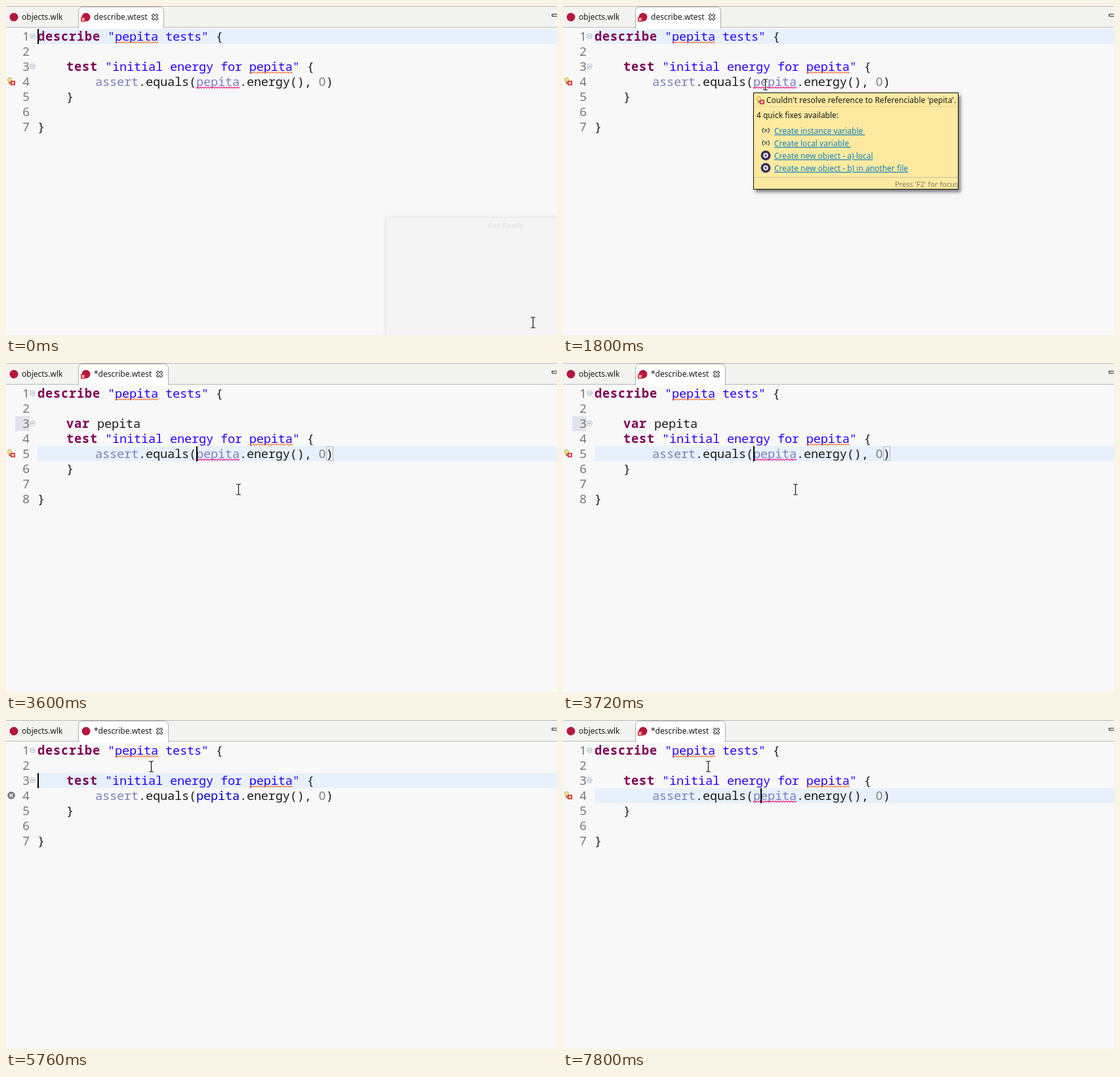
These frames come from a looping animation (840x502 px, 8 s). An HTML page:

```html
<!DOCTYPE html>
<html lang="en">
<head>
<meta charset="utf-8">
<title>Quick fix in a test editor</title>
<style>
  html, body { margin: 0; height: 100%; overflow: hidden; background: #f8f8f8; }
  svg { display: block; width: 840px; height: 502px; }
  text { white-space: pre; font: 12px "Noto Sans", "Open Sans", sans-serif; fill: #1a1a1a; }
  .code { font: 18.67px "Noto Sans Mono", "DejaVu Sans Mono", monospace; letter-spacing: -.2px; }
  .key { font-weight: bold; letter-spacing: .8px; fill: #7f0055; }
  .str { fill: #2a00ff; }
  .ref { fill: #7d7dbe; }
  .field { fill: #0000c0; }
  .digit { font: 18.67px "Noto Sans", sans-serif; letter-spacing: .32px; fill: #7d7d7d; }
  .row { text-anchor: middle; letter-spacing: 0; fill: #787878; }
  .link { fill: #1583bd; text-decoration: underline; }
  .hint { font-size: 11px; text-anchor: end; fill: #827b63; }
  .ready { font-size: 10.67px; font-weight: bold; fill: #e5e5e5; }
  .popup { filter: drop-shadow(3px 4px 2.5px rgba(0, 0, 0, .5)); }
</style>
</head>
<body>
<svg id="stage" viewBox="0 0 840 502"></svg>
<script>
const LOOP = 8000, STEP = 120, LEFT = 48, ROW = 23;

// [time, x, y]
const pointerPath = [
  [0, 803, 483], [120, 398, 271], [240, 398, 271], [840, 274, 132], [960, 272, 128],
  [1080, 300, 122], [1200, 306, 121], [1320, 308, 120], [2520, 308, 120], [3000, 354, 193],
  [3960, 354, 193], [4320, 418, 140], [4440, 418, 140], [4680, 204, 88], [4920, 204, 88], [5040, 221, 71]
];
// [time, row, x]; without x the caret is blinked off
const caretMoves = [
  [0, 1, 48], [600, 1], [1080, 1, 48], [1680, 1], [2280, 1, 48], [2760, 1], [3240, 1, 48],
  [3600, 5, 290], [4200, 5], [4800, 3, 205], [5400, 3], [5760, 3, 48], [6240, 3], [6480, 4, 48],
  [6840, 4, 92], [7080, 4], [7320, 4, 136], [7440, 4, 202], [7560, 4, 213], [7680, 4, 279], [7800, 4, 301]
];

const stage = document.getElementById('stage');
const rowTop = row => 35 + ROW * (row - 1);
const latest = (list, t) => list.filter(item => item[0] <= t).pop();

const rect = (x, y, w, h, fill, more = '') =>
  `<rect x="${x}" y="${y}" width="${w}" height="${h}" fill="${fill}" ${more}/>`;
const circle = (x, y, r, fill, more = '') =>
  `<circle cx="${x}" cy="${y}" r="${r}" fill="${fill}" ${more}/>`;
const path = (d, stroke, width = 1, fill = 'none') =>
  `<path d="${d}" stroke="${stroke}" stroke-width="${width}" fill="${fill}"/>`;
const text = (x, y, content, cls = '') => `<text x="${x}" y="${y}" class="${cls}">${content}</text>`;
const span = (cls, content) => `<tspan class="${cls}">${content}</tspan>`;
const cross = (x, y, r) => `M${x - r} ${y - r}l${2 * r} ${2 * r}M${x + r} ${y - r}l${-2 * r} ${2 * r}`;

const squiggle = (x, row, color) =>
  path(`M${x} ${rowTop(row) + 21.5}` + 'l2 -2l2 2'.repeat(16) + 'l2 -2', color, 1.1);
const errorBadge = (x, y) =>
  rect(x, y, 7, 7, '#d6303c') + path(cross(x + 3.5, y + 3.5, 1.8), '#fff', 1.2);
const warningBadge = (x, y) =>
  path(`M${x + 3.5} ${y}l3.5 7h-7z`, '#c89420', .8, '#f8cd46');
const bulb = (x, y) =>
  circle(x - 2.5, y - 2.5, 3, '#fbe9a0', 'stroke="#c98b1c"') +
  rect(x - 4, y + 1, 3, 3, '#b58a42') + errorBadge(x - 1, y - 1);
const solvedMark = (x, y) => circle(x, y, 5.8, '#777') + path(cross(x, y, 2.5), '#fff', 1.6);
const fold = row => {
  const y = rowTop(row) + 11;
  return circle(40.5, y, 3.8, '#f4f7fa', 'stroke="#a8bccd"') + path(`M38.5 ${y}h4`, '#6f8fab');
};

function tabs(dirty, status) {
  const right = dirty ? 247 : 240, x = right - 13;
  const badge = { error: errorBadge, warning: warningBadge }[status];
  return rect(0, 0, 840, 33, '#f3f3f2') + path('M0 .5H840M0 32.5H840', '#b9b9b9') +
    path(`M110.5 34V8Q110.5 1.5 117 1.5H${right - 6.5}Q${right + .5} 1.5 ${right + .5} 8V34`, '#adadad', 1, '#fff') +
    rect(111, 32, right - 111, 3, '#fff') +
    circle(12, 17, 6.5, '#b3183c') + text(24, 21, 'objects.wlk') +
    circle(122, 17, 6.5, '#b3183c') + (badge ? badge(114, 17) : '') +
    text(134, 21, (dirty ? '*' : '') + 'describe.wtest') +
    path(cross(x, 17, 4), '#333', 4.2) + path(cross(x, 17, 3.4), '#fff', 2) +
    rect(832.5, 12.5, 12, 3, '#fff', 'stroke="#222"');
}

function editor(t, inserted, status) {
  const error = status === 'error', shift = inserted ? 1 : 0;
  const [, caretRow, caretX] = latest(caretMoves, t);
  const name = span(error ? 'ref' : 'field', 'pepita');
  const lines = [
    [0, span('key', 'describe') + ' ' + span('str', '"pepita tests"') + ' {'],
    [0, ''],
    [4, span('key', 'test') + ' ' + span('str', '"initial energy for pepita"') + ' {'],
    [8, span('ref', 'assert') + '.equals(' + name + '.energy(), ' + span('digit', '0') + ')'],
    [4, '}'],
    [0, ''],
    [0, '}']
  ];
  if (inserted) lines.splice(2, 0, [4, span('key', 'var') + ' ' + span(error ? '' : 'field', 'pepita')]);

  let out = rect(LEFT, rowTop(caretRow), 840 - LEFT, ROW, '#e6f1fd');
  if (inserted) out += rect(14, rowTop(3), 22, ROW, '#e3e3ee');
  lines.forEach(([indent, content], i) => {
    const base = rowTop(i + 1) + 18;
    out += text(30.7, base, i + 1, 'digit row') + text(LEFT + 11 * indent, base, content, 'code');
  });
  out += fold(1) + fold(status === 'warning' ? 4 : 3);
  out += squiggle(166, 1, '#f58245') + squiggle(371, 3 + shift, '#f58245');

  const markY = rowTop(4 + shift) + 11;
  if (error) out += squiggle(290, 4 + shift, '#ea2888') + bulb(8, markY);
  else out += solvedMark(8, markY);
  if (status === 'warning') out += warningBadge(4, rowTop(3) + 7) + squiggle(139, 3, '#f4c04a');
  if (caretRow === 5) out += rect(488.5, rowTop(5) + .5, 10, 21, 'none', 'stroke="#b8b8b8"');
  if (caretX) out += rect(caretX, rowTop(caretRow), 2, ROW, '#000');
  return out;
}

function quickFixes() {
  const links = ['Create instance variable ', 'Create local variable ',
    'Create new object - a) local', 'Create new object - b) in another file'];
  return '<g class="popup">' + rect(290.5, 132.5, 312, 147, '#fdeaa0', 'stroke="#111"') + '</g>' +
    path('M291 153.5H602', '#e3d396') + path('M291 261.5H602', '#c9c2a4') +
    bulb(301, 144) + text(310, 148, "Couldn't resolve reference to Referenciable 'pepita'.") +
    text(295, 171, '4 quick fixes available:') +
    links.map((label, i) => {
      const y = 190 + 19 * i;
      const icon = i < 2
        ? path(`M306 ${y - 4}q-4 4 0 8M312.500 ${y - 4}q4 4 0 8${cross(309.2, y, 2)}`, '#333b55', 1.1)
        : circle(309, y, 7.5, '#38305a') + circle(309, y, 2.7, 'none', 'stroke="#fff" stroke-width="2"');
      return icon + text(322, y + 5, label, 'link');
    }).join('') + text(602, 276, "Press 'F2' for focus", 'hint');
}

function getReady() {
  return rect(580, 323, 270, 190, '#f4f4f4',
    'rx="3" style="filter:drop-shadow(0 0 3px rgba(0,0,0,.13))"') + text(735, 339, 'Get Ready', 'ready');
}

function pointer(t) {
  const [t0, x0, y0] = latest(pointerPath, t);
  const [t1, x1, y1] = pointerPath.find(p => p[0] > t) || [LOOP, x0, y0];
  const k = (t - t0) / (t1 - t0);
  const x = Math.round(x0 + (x1 - x0) * k), y = Math.round(y0 + (y1 - y0) * k);
  if (t >= 2880 && t < 3480)
    return path(`M${x - 1} ${y - 1}q1.500 -1.500 3 0v5l5 1.500q2 .5 2 3v4l-1 3h-7l-2 -4l-3 -3q0 -2 3 -1z`, '#fff', .7, '#000');
  const beam = `M${x - 3} ${y - 8}h2.500l1 1l1 -1h2.500M${x + .5} ${y - 7}v14M${x - 3} ${y + 8}h2.500l1 -1l1 1h2.500`;
  return path(beam, '#fff', 2.6) + path(beam, '#111', 1.2);
}

function draw(t) {
  const inserted = t >= 3600 && t < 5760;
  const status = latest([[0, 'error'], [4200, 'warning'], [5760, 'clean'], [6240, 'error']], t)[1];
  stage.innerHTML = rect(0, 0, 840, 502, '#f8f8f8') + tabs(t >= 3600, status) +
    editor(t, inserted, status) +
    (t < 120 ? getReady() : '') +
    (t >= 1800 && t < 3480 ? quickFixes() : '') + pointer(t);
}

let shown = -1;
function frame() {
  const t = Math.floor(performance.now() % LOOP / STEP) * STEP;
  if (t !== shown) draw(shown = t);
  requestAnimationFrame(frame);
}
frame();
</script>
</body>
</html>
```
